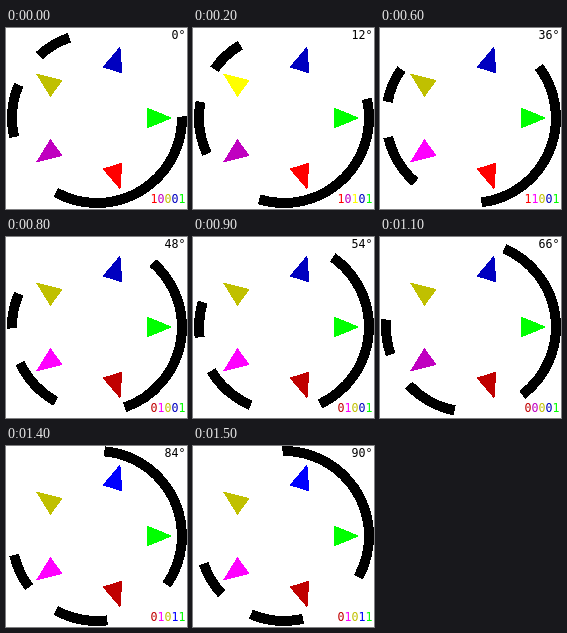
An HTML page for the animation above (1.6 s loop, 181x181 px).

```html
<!DOCTYPE html>
<html lang="en">
<head>
<meta charset="utf-8">
<title>Single-track Gray code encoder</title>
<style>
  html, body { margin: 0; height: 100%; overflow: hidden; background: #fff; }
  svg { display: block; width: 100vw; height: 100vh; }
  text { font: 11.63px "DejaVu Sans Mono", monospace; text-anchor: end; }
</style>
</head>
<body>
<svg viewBox="0 0 181 181">
  <g transform="translate(91 90)" shape-rendering="crispEdges">
    <circle id="track" r="85" fill="none" stroke="#000" stroke-width="10" pathLength="360"/>
    <g id="sensors"></g>
  </g>
  <text id="angle" x="179.5" y="11"></text>
  <text id="code" x="179.5" y="175"></text>
</svg>
<script>
const STEP_MS = 100, STEPS = 16, STEP_DEG = 6;
const OFFSET = -1; // keeps sensors clear of segment edges
const SEGMENTS = [[0, 120], [168, 204], [228, 252]]; // clockwise degrees
const SENSORS = [ // [degrees, lit, unlit], in digit order
  [72, '#f00', '#c00000'],
  [144, '#f0f', '#c000c0'],
  [216, '#ff0', '#c0c000'],
  [288, '#00f', '#0000c0'],
  [0, '#0f0', '#00c000'],
];

const byId = id => document.getElementById(id);
const track = byId('track'), angleText = byId('angle');

function add(parent, tag, attrs = {}) {
  const node = document.createElementNS('http://www.w3.org/2000/svg', tag);
  for (const name in attrs) node.setAttribute(name, attrs[name]);
  return parent.appendChild(node);
}

track.setAttribute('stroke-dasharray', SEGMENTS.map(([from, to], i) => {
  const next = i + 1 < SEGMENTS.length ? SEGMENTS[i + 1][0] : 360;
  return `${to - from} ${next - to}`;
}).join(' '));

const sensors = SENSORS.map(([at, lit, unlit]) => ({
  at, lit, unlit,
  marker: add(byId('sensors'), 'path', { d: 'M50-10.5 75.5 0 50 10.5z', transform: `rotate(${at})` }),
  digit: add(byId('code'), 'tspan'),
}));

function isBlack(degrees) {
  const d = (degrees + 720) % 360;
  return SEGMENTS.some(([from, to]) => d >= from && d < to);
}

function show(angle) {
  track.setAttribute('transform', `rotate(${OFFSET - angle})`);
  angleText.textContent = angle + '°';
  for (const { at, lit, unlit, marker, digit } of sensors) {
    const on = isBlack(at + angle - OFFSET);
    const color = on ? lit : unlit;
    marker.setAttribute('fill', color);
    digit.setAttribute('fill', color);
    digit.textContent = on ? 1 : 0;
  }
}

const start = performance.now();
function tick() {
  const step = Math.floor((performance.now() - start) / STEP_MS) % STEPS;
  show(step * STEP_DEG);
  requestAnimationFrame(tick);
}
tick();
</script>
</body>
</html>
```
